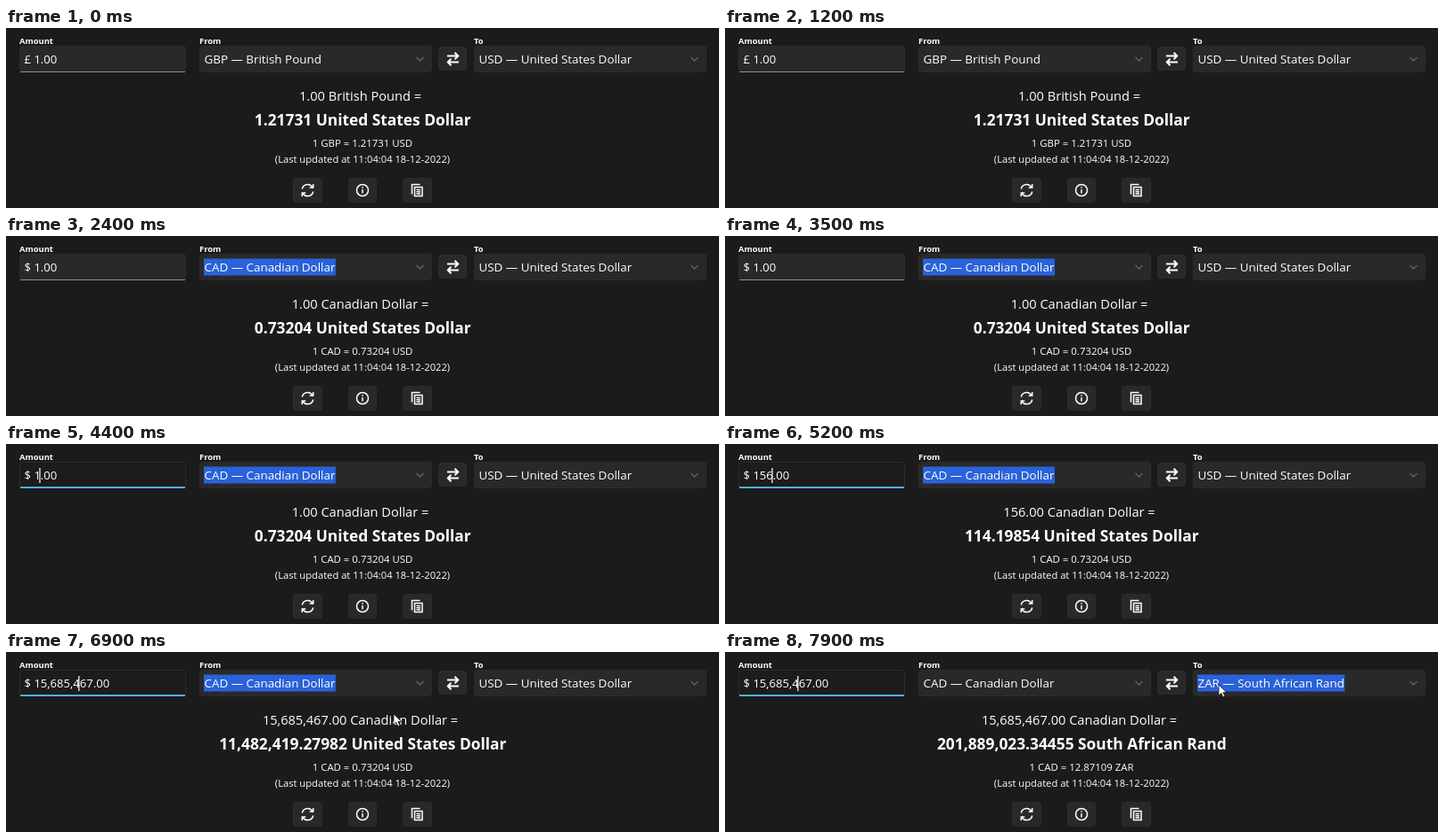
An HTML page for the animation above (8 s loop, 800 by 203 pixels).

```html
<!DOCTYPE html>
<html lang="en">
<head>
<meta charset="utf-8">
<title>Currency converter</title>
<style>
  html, body { margin: 0; width: 100%; height: 100%; overflow: hidden; background: #1c1b1c; }
  svg { display: block; }
  text { font: 13.4px "Open Sans", "Noto Sans", sans-serif; fill: #fff; white-space: pre; }
  .label { font-size: 9.4px; font-weight: 700; }
  .mid { text-anchor: middle; }
  #amount { font-size: 13.1px; }
  #line { font-size: 14.6px; }
  #total { font-size: 17.35px; font-weight: 700; }
  #rate { font-size: 11.4px; }
  #updated { font-size: 11.2px; }
  .box { fill: #2a292a; stroke: #2d2c2d; }
  .box .focused { fill: #1d1c1d; }
  .chevron { fill: none; stroke: #6c6c6c; stroke-width: 1.1; }
  .icon { fill: none; stroke: #fff; stroke-width: 1.5; }
  .mark { fill: #2a62d9; }
</style>
</head>
<body>
<svg width="800" height="203" viewBox="0 0 800 203">
  <text class="label" x="15" y="17.5">Amount</text>
  <text class="label" x="217" y="17.5">From</text>
  <text class="label" x="525" y="17.5">To</text>

  <g class="box">
    <rect id="field" x="15.5" y="20.5" width="186" height="29" rx="3"/>
    <rect x="217.5" y="20.5" width="260" height="29" rx="3"/>
    <rect x="485.5" y="21.5" width="31" height="26" rx="3"/>
    <rect x="525.5" y="20.5" width="260" height="29" rx="3"/>
    <rect x="322.5" y="169.5" width="32" height="27" rx="3"/>
    <rect x="384.5" y="169.5" width="31" height="27" rx="3"/>
    <rect x="445.5" y="169.5" width="32" height="27" rx="3"/>
  </g>
  <rect id="underline" x="16" width="185" rx=".5"/>
  <path class="chevron" d="M460.5 33.200l4 3.800 4-3.800M768.500 33.200l4 3.800 4-3.800"/>

  <!-- swap, refresh, info, copy -->
  <path class="icon" style="stroke-width:2" d="M495 31.500h12M503.500 27.800l3.700 3.700-3.700 3.700M508 38.500h-12M499.500 34.800l-3.700 3.700 3.700 3.700"/>
  <path class="icon" d="M332.300 181.500a6.300 6.300 0 0 1 11.700-1.800M344.700 176v4h-4M344.700 184.500a6.300 6.300 0 0 1-11.700 1.800M332.300 190v-4h4"/>
  <g class="icon">
    <circle cx="400" cy="183" r="6.500"/>
    <path d="M400 182v4.500M400 179.300v1.500"/>
  </g>
  <path class="icon" d="M458.500 179.500h8.500v10h-8.500zM455.500 187.500v-11h9M460.500 182.500h4.500M460.500 184.700h4.500M460.500 187h4.500"/>

  <rect id="fromMark" class="mark" x="222" y="25.500" height="19"/>
  <rect id="toMark" class="mark" x="530" y="25.500" height="19"/>
  <text id="amount" x="20.500" y="40"></text>
  <text id="from" x="222.500" y="40"></text>
  <text id="to" x="530.500" y="40"></text>
  <rect id="caret" y="27" width="1.200" height="17" fill="#fff"/>

  <text id="line" class="mid" x="397.500" y="82"></text>
  <text id="total" class="mid" x="400.300" y="109.500"></text>
  <text id="rate" class="mid" x="400" y="133.500"></text>
  <text id="updated" class="mid" x="400" y="152.300">(Last updated at 11:04:04 18-12-2022)</text>

  <path id="pointer" d="M0 0v12l2.800-2.600 2 4.300 2-.9-2-4.200h3.900z" fill="#fff" stroke="#111" stroke-width=".7"/>
</svg>
<script>
const LOOP = 8000, FOCUS = 4100;
const $ = id => document.getElementById(id);

const names = {
  GBP: 'British Pound', CNY: 'Chinese/Yuan Renminbi', CAD: 'Canadian Dollar',
  USD: 'United States Dollar', ZAR: 'South African Rand'
};
const symbols = { GBP: '£', CNY: '¥', CAD: '$' };
const rates = {
  GBPUSD: 1.21731, CNYUSD: 0.14343,
  CADUSD: 0.7320419136912, CADZAR: 12.8710878257275
};
const keys = [[4900, 5], [5100, 6], [5500, 7], [5800, 8], [5900, 5], [6000, 6], [6500, 4]];
const path = [[6700, 410, 203], [6900, 435, 70], [7300, 554, 37]];

const fixed = (n, places) => n.toLocaleString('en-US', {
  minimumFractionDigits: places, maximumFractionDigits: places
});

// Grouping is redone after each key while the caret keeps its index.
function typed(t) {
  let text = '1', caret = 1, last = FOCUS;
  for (const [at, key] of keys) {
    if (t < at) break;
    text = text.slice(0, caret) + key + text.slice(caret);
    text = fixed(+text.replace(/,/g, ''), 0);
    caret++;
    last = at;
  }
  return { text, caret, last };
}

function put(id, text) {
  const el = $(id);
  if (el.textContent !== text) el.textContent = text;
  return el;
}

function combo(id, code, selected) {
  const el = put(id, `${code} — ${names[code]}`);
  $(id + 'Mark').setAttribute('width', selected ? el.getComputedTextLength() + 1 : 0);
}

function movePointer(t) {
  const el = $('pointer');
  el.style.display = t < path[0][0] ? 'none' : '';
  let [, x, y] = path[path.length - 1];
  for (let i = 1; i < path.length; i++) {
    const [t0, x0, y0] = path[i - 1], [t1, x1, y1] = path[i];
    if (t >= t0 && t < t1) {
      const k = (t - t0) / (t1 - t0);
      x = x0 + (x1 - x0) * k;
      y = y0 + (y1 - y0) * k;
    }
  }
  el.setAttribute('transform', `translate(${x} ${y})`);
}

function draw(t) {
  const from = t < 1300 ? 'GBP' : t < 2400 ? 'CNY' : 'CAD';
  const to = t < 7700 ? 'USD' : 'ZAR';
  const { text, caret, last } = typed(t);
  const value = +text.replace(/,/g, ''), rate = rates[from + to];

  combo('from', from, t >= 1300 && t < 7400);
  combo('to', to, t >= 7400);
  const amount = put('amount', `${symbols[from]} ${text}.00`);
  put('line', `${text}.00 ${names[from]} =`);
  put('total', `${fixed(value * rate, 5)} ${names[to]}`);
  put('rate', `1 ${from} = ${fixed(rate, 5)} ${to}`);

  const focused = t >= FOCUS, line = $('underline');
  $('field').classList.toggle('focused', focused);
  line.setAttribute('y', focused ? 48 : 49);
  line.setAttribute('height', focused ? 2 : 1);
  line.setAttribute('fill', focused ? '#4ab4ea' : '#929292');

  $('caret').style.display = focused && (t - last) % 1000 < 500 ? '' : 'none';
  $('caret').setAttribute('x', 19 + amount.getSubStringLength(0, caret + 2));
  movePointer(t);
}

let start;
function frame(now) {
  start ??= now;
  draw((now - start) % LOOP);
  requestAnimationFrame(frame);
}
draw(0);
requestAnimationFrame(frame);
</script>
</body>
</html>
```
